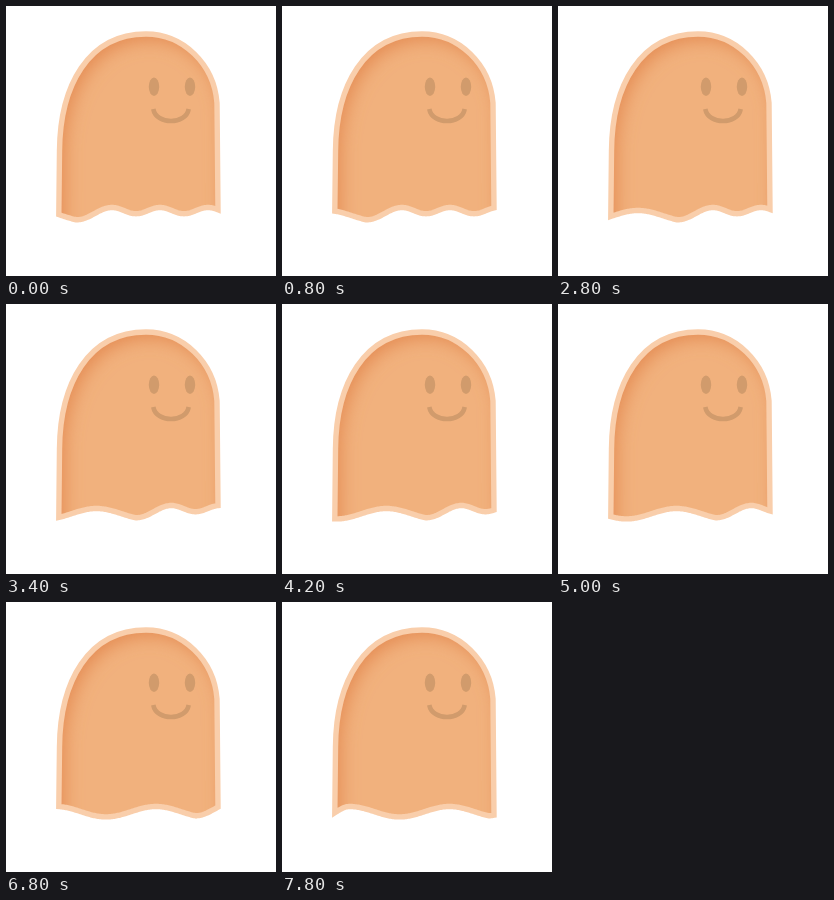
These frames come from a looping animation (270 by 270 pixels, 8 s). An HTML page:

```html
<!DOCTYPE html>
<html lang="en">
<head>
<meta charset="utf-8">
<title>Ghost</title>
<style>
  html, body { margin: 0; width: 100%; height: 100%; overflow: hidden; background: #fff; }
  svg { display: block; width: 100%; height: 100%; }
</style>
</head>
<body>
<svg viewBox="0 0 270 270">
  <defs>
    <path id="body"/>
    <clipPath id="inside"><use href="#body"/></clipPath>
    <filter id="soft" filterUnits="userSpaceOnUse" x="-60" y="-60" width="400" height="500">
      <feGaussianBlur stdDeviation="9"/>
    </filter>
  </defs>
  <use href="#body" fill="#f1b17d"/>
  <g clip-path="url(#inside)">
    <path id="shade" fill="#e48b52" fill-rule="evenodd" transform="translate(5 6)" filter="url(#soft)"/>
  </g>
  <use href="#body" fill="none" stroke="#f9ceab" stroke-width="5.4" stroke-miterlimit="10"/>
  <g fill="#d19b6c">
    <ellipse cx="148" cy="80.7" rx="5.2" ry="9.2"/>
    <ellipse cx="184" cy="80.7" rx="5.2" ry="9.2"/>
  </g>
  <path d="M147.3 103C150 119 180 119 182.7 103" fill="none" stroke="#d19b6c" stroke-width="4.6"/>
</svg>
<script>
  const LOOP = 8000, STEP = 200, SPEED = 0.0175;
  const LEFT = 52.8, RIGHT = 212;
  const DOME = 'L53.5 145C54 80 82 28 140 28C177 28 208 58 211 97Z';

  const body = document.getElementById('body');

  // The shade is everything outside the dome, blurred inwards; the dome runs on below the hem.
  document.getElementById('shade').setAttribute('d',
    `M-50-50H320V420H-50ZM${RIGHT} 420L${LEFT} 420${DOME}`);

  // Hem height: long swells, then one steep rise into short ripples
  function hemHeight(u) {
    const swell = (mid, size, crest, period) =>
      mid - size * Math.cos(2 * Math.PI * (u - crest) / period);
    if (u < -69) return swell(209.7, 5.2, -69, 52);
    if (u < 71) return swell(209.7, 5.2, 31, 100);
    if (u < 106) return swell(207.6, 6.1, 106, 70);
    return swell(204.6, 3.1, 106, 48);
  }

  function draw(time) {
    const shift = SPEED * Math.floor(time % LOOP / STEP) * STEP;
    const point = x => `${x.toFixed(2)} ${hemHeight(x - shift).toFixed(2)}`;
    const points = [];
    for (let x = RIGHT; x > LEFT + 1; x--) points.push(point(x));
    points.push(point(LEFT));
    body.setAttribute('d', `M${points.join('L')}${DOME}`);
  }

  function tick() {
    draw(performance.now());
    requestAnimationFrame(tick);
  }
  tick();
</script>
</body>
</html>
```
